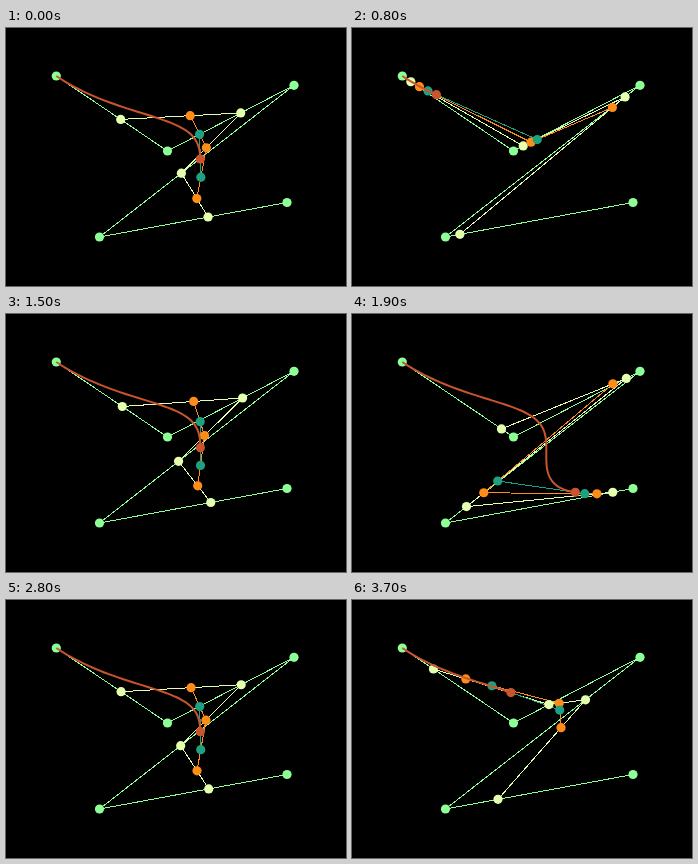
Animation of 340 by 258 pixels, one loop 3800 ms. Source, as an HTML page:

```html
<!DOCTYPE html>
<html lang="en">
<head>
<meta charset="utf-8">
<title>Bézier construction</title>
<style>
  html, body { margin: 0; width: 100%; height: 100%; overflow: hidden; background: #000; }
  svg { display: block; width: 100vw; height: 100vh; }
  path { fill: none; stroke-width: 1; shape-rendering: crispEdges; }
  #trace { stroke: #c8552d; stroke-width: 2; shape-rendering: auto; }
</style>
</head>
<body>
<svg id="stage" viewBox="0 0 340 258"></svg>
<script>
const LOOP = 3800, STEP = 100, RADIUS = 4.6;
const controls = [[50.3, 48], [161.5, 123], [288, 57.3], [93.5, 209], [281, 174.5]];
const colors = ['#8cff96', '#e4ffae', '#ff8c19', '#20a082', '#c8552d'];

// [ms, passes along the curve]; the fraction is the curve parameter
const keys = [
  [0, 0.579], [500, 0.918], [600, 0.986], [700, 1.004], [1100, 1.295],
  [1900, 1.892], [2100, 2.02], [2400, 2.234], [3200, 2.931], [3300, 3], [3700, 3.28]
];

const stage = document.getElementById('stage');

function add(tag, attrs) {
  const el = document.createElementNS('http://www.w3.org/2000/svg', tag);
  for (const name in attrs) el.setAttribute(name, attrs[name]);
  return stage.appendChild(el);
}

const mix = (a, b, t) => a + (b - a) * t;
const toPath = pts => 'M' + pts.map(p => p.map(v => v.toFixed(2)).join(' ')).join('L');

// Every level of de Casteljau's construction, from the controls to the curve point
function construct(t) {
  const levels = [controls];
  while (levels.at(-1).length > 1) {
    const prev = levels.at(-1);
    levels.push(prev.slice(1).map((p, i) => [mix(prev[i][0], p[0], t), mix(prev[i][1], p[1], t)]));
  }
  return levels;
}

function parameterAt(ms) {
  const i = Math.max(1, keys.findIndex(k => k[0] >= ms));
  const [a, b] = [keys[i - 1], keys[i]];
  return mix(a[1], b[1], (ms - a[0]) / (b[0] - a[0])) % 1;
}

const lines = colors.slice(0, -1).map(stroke => add('path', { stroke }));
const dots = colors.map((fill, level) =>
  Array.from({ length: controls.length - level }, () => add('circle', { r: RADIUS, fill })));
const trace = add('path', { id: 'trace' });
stage.append(dots.at(-1)[0]);

function draw(ms) {
  const t = parameterAt(ms);
  const levels = construct(t);
  lines.forEach((line, i) => line.setAttribute('d', toPath(levels[i])));
  dots.forEach((row, i) => row.forEach((dot, j) => {
    dot.setAttribute('cx', levels[i][j][0]);
    dot.setAttribute('cy', levels[i][j][1]);
  }));
  const count = Math.ceil(t * 80) + 1;
  const points = Array.from({ length: count + 1 }, (_, i) => construct(t * i / count).at(-1)[0]);
  trace.setAttribute('d', toPath(points));
}

const start = performance.now();
function tick() {
  const ms = (performance.now() - start) % LOOP;
  draw(Math.floor(ms / STEP) * STEP);
  requestAnimationFrame(tick);
}
tick();
</script>
</body>
</html>
```
